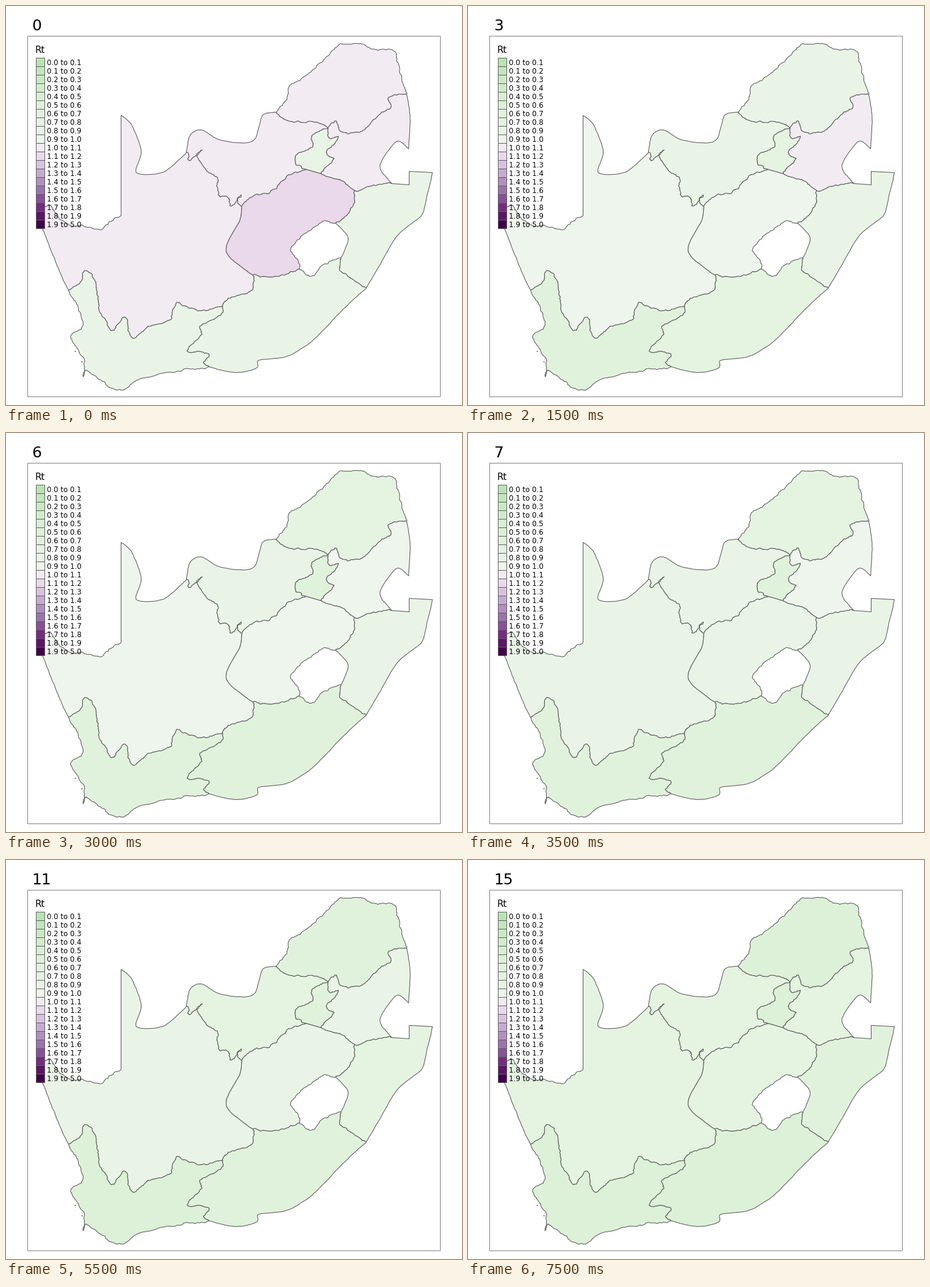
These frames come from a looping animation (747 by 655 pixels, 8 s). A matplotlib script:

```python
import matplotlib.pyplot as plt
import numpy as np
from matplotlib.animation import FuncAnimation
from matplotlib.colors import LinearSegmentedColormap
from matplotlib.patches import Circle, Polygon, Rectangle

W, H, DPI = 747, 655, 64
PX = 72 / DPI  # points per pixel
DAYS = 16
EDGE = "#606060"

plt.rcParams["font.family"] = "DejaVu Sans"
rng = np.random.default_rng(7)

# Colour classes: ten greens below Rt = 1, ten purples above
greens = LinearSegmentedColormap.from_list("g", ["#f7f7f7", "#d9f0d3", "#a6dba0"])
purples = LinearSegmentedColormap.from_list(
    "p", ["#f7f7f7", "#e7d4e8", "#c2a5cf", "#9970ab", "#762a83", "#40004b"])
COLORS = ([greens(t) for t in np.linspace(0.8, 0.16, 10)]
          + [purples(t) for t in np.linspace(0.07, 1, 10)])

# Corners where borders meet or turn sharply
NODES = dict(
    M=(49, 352), K=(188, 343), T=(188, 179), A=(295, 240), B=(441, 174),
    C=(656, 145), W=(659, 234), S=(632, 291), X=(660, 293), Z=(660, 271),
    Y=(698, 273), D=(590, 462), E=(333, 592), F=(102, 466), G=(354, 492),
    H=(404, 441), I=(386, 328), J=(492, 268), N=(527, 200), P=(516, 275),
    Q=(570, 302), R=(539, 356), U=(480, 431), V=(548, 413))

# Key points between two corners; pairs not listed are straight
SMOOTH = dict(
    TA=(206, 196, 221, 240, 213, 273, 258, 272),
    AB=(301, 212, 320, 203, 344, 217, 380, 224, 408, 217, 419, 180),
    CW=(661, 176, 661, 205),
    WS=(639, 222, 613, 258, 619, 277),
    YD=(687, 322, 678, 346, 641, 376, 616, 417),
    DE=(560, 490, 507, 544, 461, 574, 414, 581, 411, 593, 379, 601),
    FM=(80, 417, 62, 371),
    HI=(388, 430, 360, 400, 382, 353),
    RV=(560, 382),
)
RAGGED = dict(
    MK=(58, 334, 72, 326, 86, 347, 112, 361, 153, 367, 168, 354),
    BC=(459, 154, 463, 132, 501, 105, 541, 67, 570, 61, 600, 70, 633, 72,
        644, 107),
    EF=(300, 595, 273, 601, 218, 612, 188, 630, 150, 611, 131, 597, 126, 608,
        126, 576, 105, 543, 123, 528, 118, 495),
    FG=(122, 452, 130, 434, 147, 460, 151, 494, 171, 532, 196, 512, 208, 545,
        237, 525, 270, 514, 279, 486, 314, 500),
    GE=(350, 508, 317, 525, 320, 539, 296, 566, 330, 570, 323, 585),
    GH=(367, 479, 404, 464),
    IA=(379, 320, 385, 310, 369, 328, 362, 313, 349, 311, 346, 281, 328, 270,
        313, 247, 321, 236, 301, 253),
    IJ=(404, 312, 441, 300, 459, 279),
    BN=(466, 189, 508, 190),
    NC=(540, 188, 547, 205, 583, 205, 611, 178, 630, 166, 626, 150),
    NJ=(503, 210, 500, 232, 477, 242, 474, 260),
    NP=(530, 217, 544, 214, 524, 240, 537, 250, 522, 265),
    PQ=(546, 284),
    QS=(600, 294),
    QR=(568, 328, 550, 350),
    RU=(521, 352, 491, 372, 466, 399, 479, 421),
    UV=(499, 443, 521, 423),
    HU=(443, 443),
    VD=(549, 436),
)

# Corners around each province, then its first and last colour class and
# the power that eases one into the other
PROVINCES = [
    ("MKTAIHGF", 10, 7, 0.8),
    ("ABNJI", 10, 7, 0.3),
    ("BCN", 10, 5, 0.6),
    ("CWSQPN", 10, 7, 1.5),
    ("JNP", 8, 5, 0.6),
    ("IJPQRUH", 11, 7, 0.6),
    ("SXZYDVRQ", 8, 6, 2),
    ("DEGHUV", 8, 5, 0.7),
    ("EFG", 8, 5, 0.4),
]


def border(pair, points, rough):
    """Smooth curve through the points, shaken a little at each subdivision."""
    a, b = pair
    p = np.array([NODES[a], *zip(points[::2], points[1::2]), NODES[b]]) + 0.5
    for _ in range(4):
        q = np.vstack([2 * p[0] - p[1], p, 2 * p[-1] - p[-2]])
        mid = (9 * (q[1:-2] + q[2:-1]) - q[:-3] - q[3:]) / 16
        step = np.diff(p, axis=0)
        normal = step[:, ::-1] * [-1, 1]
        size = np.hypot(*step.T)[:, None]
        mid += normal * rng.normal(0, rough, size.shape) / np.sqrt(size)
        p = np.insert(p, range(1, len(p)), mid, axis=0)
    return p


BORDERS = {k: border(k, v, 0.06) for k, v in SMOOTH.items()}
BORDERS |= {k: border(k, v, 0.24) for k, v in RAGGED.items()}


def outline(loop):
    parts = []
    for a, b in zip(loop, loop[1:] + loop[0]):
        if b + a in BORDERS:
            parts.append(BORDERS[b + a][::-1])
        else:
            parts.append(BORDERS.get(a + b, np.array([NODES[a], NODES[b]]) + 0.5))
    return np.vstack(parts)


fig = plt.figure(figsize=(W / DPI, H / DPI), dpi=DPI, facecolor="white")
ax = fig.add_axes([0, 0, 1, 1])
ax.set(xlim=(0, W), ylim=(H, 0))
ax.axis("off")


def label(x, y, text, size):
    return ax.text(x, y, text, size=size * PX, color="black",
                   va="baseline", ha="left", zorder=4)


def box(x, y, w, h, **style):
    ax.add_patch(Rectangle((x, y), w, h, lw=PX, snap=False, zorder=3, **style))


shapes = []
for loop, first, last, power in PROVINCES:
    shape = Polygon(outline(loop), ec=EDGE, lw=1.1 * PX, joinstyle="round")
    shapes.append((ax.add_patch(shape), first, last, power))
for x, y in [(113.5, 567), (124.5, 584)]:
    ax.add_patch(Circle((x, y), 1, color=EDGE, lw=0, zorder=2))

box(35.5, 49.5, 676, 592, fc="none", ec="#808080")

label(47.4, 77, "Rt", 15)
for i, color in enumerate(COLORS):
    top = 5 if i == 19 else (i + 1) / 10
    box(49.5, 85.5 + 14 * i, 14, 14, fc=color, ec=EDGE)
    label(66.9, 97 + 14 * i, f"{i / 10:.1f} to {top:.1f}", 11.7)

title = label(42.6, 40, "", 25)


def update(day):
    title.set_text(str(day))
    t = day / (DAYS - 1)
    for shape, first, last, power in shapes:
        shape.set_facecolor(COLORS[round(first + (last - first) * t ** power)])
    return [title] + [s[0] for s in shapes]


anim = FuncAnimation(fig, update, frames=DAYS, interval=500,
                     repeat=True, repeat_delay=0, blit=False)
plt.show()
```
